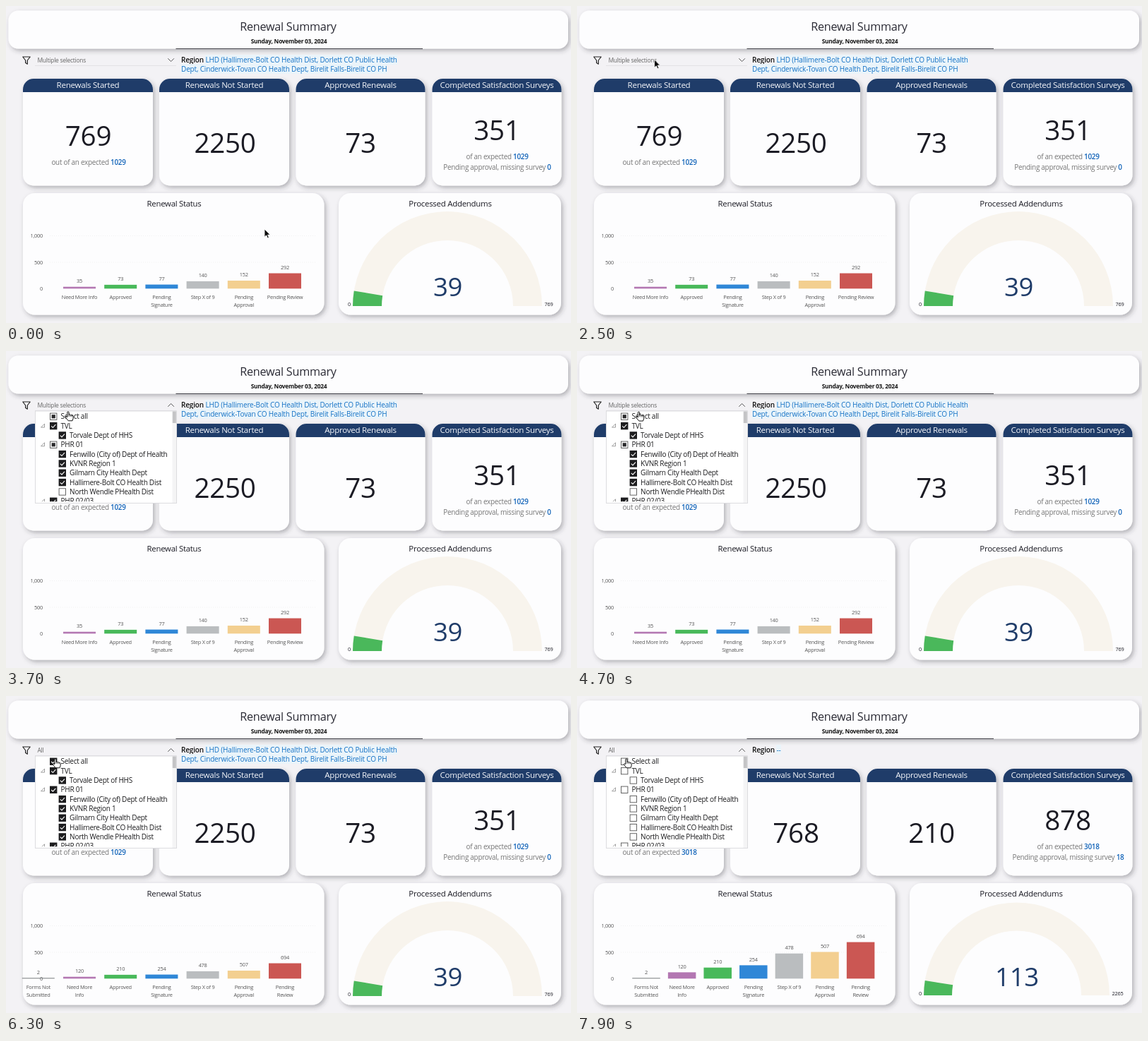
These frames come from a looping animation (800 by 449 pixels, 8000 ms). An HTML page:

```html
<!DOCTYPE html>
<html lang="en">
<head>
<meta charset="utf-8">
<title>Renewal Summary</title>
<style>
  html, body { margin: 0; width: 100%; height: 100%; overflow: hidden; background: #f3f2f5; }
  svg { position: absolute; left: 0; top: 0; display: block; }
  svg, #region { font-family: "Open Sans", "Noto Sans", sans-serif; letter-spacing: -0.016em; }
  #region { position: absolute; left: 248px; top: 69.5px; font-size: 10px; line-height: 13.5px; white-space: pre; color: #111; }
  #region b { font-weight: 600; }
  #region span { color: #1673c6; background: #eaf4fa; }
</style>
</head>
<body>
<svg id="base" width="800" height="449"></svg>
<div id="region"></div>
<svg id="live" width="800" height="449"></svg>
<script>
const LOOP = 8000, STEP = 100;
const NAVY = '#1f3c69', INK = '#1b1b24', GREY = '#767676', LINK = '#0f62b8';
const OPEN = 2900, CHECK = 6300, LOADED = 7000, UNCHECK = 7300;
const el = id => document.getElementById(id);

const rect = (x, y, w, h, fill, extra = '') =>
  `<rect x="${x}" y="${y}" width="${w}" height="${h}" fill="${fill}" ${extra}/>`;
const line = (d, color, width = 1, extra = '') =>
  `<path d="${d}" fill="none" stroke="${color}" stroke-width="${width}" ${extra}/>`;
const text = (x, y, s, size, fill = INK, anchor = 'middle', weight = 400) =>
  `<text x="${x}" y="${y}" font-size="${size}" fill="${fill}" text-anchor="${anchor}" font-weight="${weight}">${s}</text>`;
const strong = s => `<tspan fill="${LINK}" font-weight="600">${s}</tspan>`;
const smooth = p => { p = Math.min(1, Math.max(0, p)); return p * p * (3 - 2 * p); };
const mix = (a, b, p) => a + (b - a) * p;

// Static cards and headings
const card = (x, y, w, h, r) => rect(x, y, w, h, '#fdfdfe', `rx="${r}" filter="url(#shade)"`);

function baseScene() {
  const tiles = [[24, 184, 'Renewals Started'], [217, 184, 'Renewals Not Started'],
    [410.5, 183, 'Approved Renewals'], [603.5, 183, 'Completed Satisfaction Surveys']];
  let s = `<defs><filter id="shade" x="-10%" y="-20%" width="125%" height="150%">
    <feDropShadow dx="2.5" dy="3" stdDeviation="3" flood-color="#33333f" flood-opacity=".34"/></filter></defs>`;
  s += card(3.5, 6.5, 792.5, 54, 14);
  s += text(399.5, 35, 'Renewal Summary', 16.2, '#2b2b35');
  s += text(400.5, 53, 'Sunday, November 03, 2024', 8.35, '#151515', 'middle', 700);
  s += line('M23.8 72H34.2L30.3 77V82.2L27.6 80.6V77Z', '#222', 1.2, 'stroke-linejoin="round"');
  for (const [x, w, label] of tiles) {
    s += card(x, 103, w, 151.5, 15);
    s += `<path d="M${x} 122V118a15 15 0 0 1 15-15H${x + w - 15}a15 15 0 0 1 15 15V122Z" fill="${NAVY}"/>`;
    s += text(x + w / 2, 115.5, label, 11.55, '#f4f6fa');
  }
  s += card(24, 265, 426.5, 172.5, 17) + card(471, 265, 315, 172.5, 17);
  s += text(238, 284, 'Renewal Status', 11.35) + text(629, 284, 'Processed Addendums', 11.45);
  [['0', 400], ['500', 363], ['1,000', 325.5]].forEach(([v, y], i) => {
    s += text(52, y + 2.8, v, 7.4, '#555', 'end');
    if (i) s += line(`M62 ${y}H440`, '#f1f1f2', 1, 'stroke-dasharray="1 2"');
  });
  return s;
}

// Bar chart: label, first value, second value, colour
const BARS = [
  ['Forms Not|Submitted', 0, 2, '#777b7d'],
  ['Need More|Info', 35, 120, '#b377b2'],
  ['Approved', 73, 210, '#48b95a'],
  ['Pending|Signature', 77, 254, '#2f87d7'],
  ['Step X of 9', 140, 478, '#babdbf'],
  ['Pending|Approval', 152, 507, '#f3cf90'],
  ['Pending|Review', 292, 694, '#cb5753'],
];
const ONE_LINE = ['Need More|Info', 'Pending|Review'];

function chart(t) {
  const p = smooth((t - CHECK) / 400), after = t >= CHECK;
  let s = '';
  BARS.forEach(([name, a, b, color], i) => {
    if (!i && !after) return;
    const x = mix(104 + (i - 1) * 58.2, 98 + i * 50.6, p);
    const w = mix(46, 39.5, p), h = Math.max(1, mix(a, b, p) * 0.0745);
    s += rect(x - w / 2, 400.3 - h, w, h, color);
    s += text(x, 394.6 - h, after ? b : a, 7.4, '#555');
    const wide = !after && ONE_LINE.includes(name);
    (wide ? [name.replace('|', ' ')] : name.split('|'))
      .forEach((part, k) => { s += text(x, 415.3 + k * 10.2, part, 7.4, '#555'); });
  });
  return s;
}

// Half-ring slice from angle a to b, in degrees from the left
function slice(cx, cy, R, r, a, b, fill) {
  const at = (rad, deg) => {
    const q = deg * Math.PI / 180;
    return `${cx - rad * Math.cos(q)} ${cy - rad * Math.sin(q)}`;
  };
  return `<path d="M${at(R, a)}A${R} ${R} 0 0 1 ${at(R, b)}L${at(r, b)}A${r} ${r} 0 0 0 ${at(r, a)}Z" fill="${fill}"/>`;
}

function gauge(t) {
  const after = t >= CHECK + 200;
  const [cx, cy, R, r] = after ? [622.5, 424, 131.5, 91.5] : [625, 425, 134, 93];
  return slice(cx, cy, R, r, 0, 180, '#f8f4ed') + slice(cx, cy, R, r, 0, 9.2, '#4ab85b')
    + text(486, cy, 0, 7.4) + text(cx + R + 3.5, cy, after ? 2265 : 769, 7.4, INK, 'start')
    + text(cx + .5, 411, t >= LOADED ? 113 : 39, 36.5, NAVY);
}

function numbers(t) {
  const done = t >= LOADED, busy = t >= CHECK + 200 && !done;
  const big = (x, y, v) => text(x, y, v, 38.6);
  const note = (x, y, s, v) => text(x, y, `${s} ${strong(v)}`, 9.9, GREY);
  let s = '';
  if (!busy) {
    s += big(116.5, 198, done ? 2250 : 769) + note(117, 225, 'out of an expected', done ? 3018 : 1029);
    s += big(310, 208, done ? 768 : 2250) + big(502, 208, done ? 210 : 73);
  } else {
    s += [[609.5, 105], [612, 103.8], [611, 107.5]]
      .map(([x, y]) => `<circle cx="${x}" cy="${y}" r=".9" fill="#222"/>`).join('');
  }
  s += big(695, 190, done ? 878 : 351);
  s += note(695.5, 217, 'of an expected', done ? 3018 : 1029);
  return s + note(695.5, 232, 'Pending approval, missing survey', done ? 18 : 0);
}

// Drop-down rows: level, label, first state (0 empty, 1 checked, 2 partial)
const ROWS = [
  [0, 'Select all', 2], [1, 'TVL', 1], [2, 'Torvale Dept of HHS', 1], [1, 'PHR 01', 2],
  [2, 'Fenwillo (City of) Dept of Health', 1], [2, 'KVNR Region 1', 1],
  [2, 'Gilmarn City Health Dept', 1], [2, 'Hallimere-Bolt CO Health Dist', 1],
  [2, 'North Wendle PHealth Dist', 0], [1, 'PHR 02/03', 1],
];

function box(x, y, state) {
  if (state === 1) return rect(x, y, 10.4, 10.4, '#1d1d1f')
    + line(`M${x + 2.2} ${y + 5.4}l2.2 2.2 3.9-4.3`, '#fff', 1.1);
  return rect(x + .5, y + .5, 9.4, 9.4, '#fff', 'stroke="#555" stroke-width=".9"')
    + (state ? rect(x + 2.6, y + 2.6, 5.2, 5.2, '#2a2a2c') : '');
}

function slicer(t) {
  const open = t >= OPEN;
  let s = text(44.5, 79.8, t >= CHECK ? 'All' : 'Multiple selections', 8.45, '#666', 'start');
  s += line(open ? 'M229.3 78.8L233.6 74.5 237.9 78.8' : 'M229.3 74.3L233.6 78.6 237.9 74.3', '#555', 1);
  s += line('M41 84.5H241', '#e3e2e5');
  if (!open) return s;
  s += rect(41.5, 85, 200, 130.5, '#fff', 'stroke="#dcdcdf"');
  s += rect(235.5, 85.5, 5.5, 129.5, '#f4f4f5') + rect(235.8, 85.5, 5, 16.5, '#c4c4c6');
  s += '<clipPath id="list"><path d="M42 86H235V213.3H42Z"/></clipPath><g clip-path="url(#list)">';
  ROWS.forEach(([level, label, first], i) => {
    const y = 92.8 + i * 13.33, x = level === 2 ? 74.6 : 62;
    const state = t >= UNCHECK ? 0 : t >= CHECK ? 1 : first;
    s += box(x, y - 5.2, state) + text(x + 15.5, y + 3.5, label, 10, '#1c1c1e', 'start');
    if (level === 1) s += line(`M49.5 ${y + 2}h5v-5Z`, '#888', .8);
  });
  return s + '</g>';
}

function toolbar(t) {
  if (t < 1400 || t >= 1800) return '';
  const c = '#555';
  return rect(118, 85, 90, 16, '#efeef0')
    + line('M124.5 97.5l3-3M126 92l4 4M127 92.5l3-1 2-2.6 2.6 2.6-2.6 2-1 3', c)
    + line('M149.5 89h5.5v7.5h-5.5ZM147.5 91v7.5h5.5', c)
    + line('M169.5 89.7H179.5M171.3 93H177.7M173 96.3H176', c)
    + [193.3, 197, 200.7].map(x => `<circle cx="${x}" cy="93" r="1" fill="${c}"/>`).join('');
}

// Pointer stops: time, x, y
const STOPS = [
  [0, 366, 316], [1300, 366, 316], [1400, 162, 119], [1500, 161, 118], [2200, 110, 76],
  [2900, 109, 76], [3500, 88, 86], [4600, 88, 86], [5600, 71, 97], [5900, 71, 97],
  [6200, 70, 89], [8000, 70, 89],
];
const ARROW = 'M0 0V11.2L2.6 8.8 4.4 12.8 6.3 12 4.5 8.1H8Z';
const HAND = 'M-1.2.8C-1.2-.4 1-.4 1 .8V4.6C1.8 4 3 4.2 3.2 5 4 4.4 5.1 4.7 5.3 5.5 6.2 5.1 7.2 5.6 7.2 6.6V9.2L6 12.8H.2L-3.4 8.4C-4.2 7.2-2.8 6.3-1.2 7.7Z';

function pointer(t) {
  const i = STOPS.findIndex((k, n) => n && t < k[0]);
  const [a, b] = [STOPS[i - 1], STOPS[i]];
  const p = smooth((t - a[0]) / (b[0] - a[0]));
  const x = mix(a[1], b[1], p), y = mix(a[2], b[2], p);
  const shape = t >= OPEN && y > 83
    ? `<path d="${HAND}" fill="#fff" stroke="#111" stroke-width="1"/>` + line('M1 4.4V7M3.2 5V7.2M5.3 5.5V7.4', '#111', .7)
    : `<path d="${ARROW}" fill="#0b0b0b" stroke="#fff" stroke-width=".8"/>`;
  return `<g transform="translate(${x} ${y})">${shape}</g>`;
}

function region(t) {
  const busy = t >= CHECK + 200 && t < LOADED;
  if (busy) return '';
  if (t >= LOADED) return '<b>Region</b> <span>--</span>';
  return '<b>Region</b> <span>LHD (Hallimere-Bolt CO Health Dist, Dorlett CO Public Health\n'
    + 'Dept, Cinderwick-Tovan CO Health Dept, Birelit Falls-Birelit CO PH</span>';
}

function draw(t) {
  const words = region(t);
  el('region').innerHTML = words;
  el('live').innerHTML = (words ? line('M240.5 60.5H590', '#45454b') : '')
    + numbers(t) + chart(t) + gauge(t) + toolbar(t) + slicer(t) + pointer(t);
}

let last = -1;
function tick() {
  const t = Math.floor(performance.now() % LOOP / STEP) * STEP;
  if (t !== last) draw(last = t);
  requestAnimationFrame(tick);
}
el('base').innerHTML = baseScene();
tick();
</script>
</body>
</html>
```
